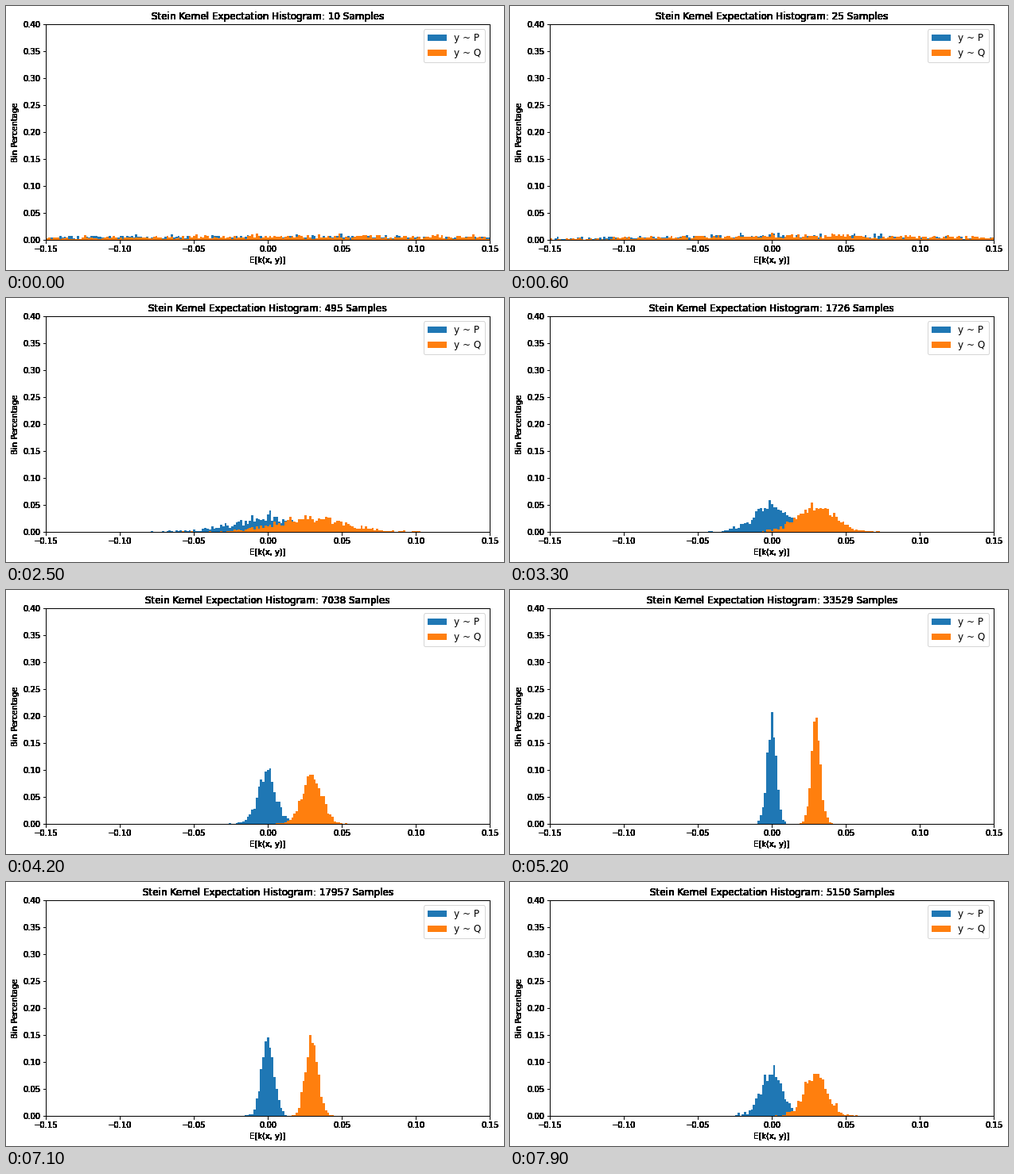
Write a matplotlib script that moves like this. It is 626 px wide and 333 px high and loops after 8000 ms.

```python
import matplotlib.pyplot as plt
import numpy as np
from matplotlib.animation import FuncAnimation

WIDTH, HEIGHT, DPI = 626, 333, 72
FRAMES, INTERVAL = 80, 100
STEPS = 60            # sample counts from 10 to 100000, then back again
TRIALS = 1600
OVERDRAW = 30         # labels look as if printed many times over
EDGES = np.linspace(-0.15, 0.15, 200)
SPREAD = 0.57
MEANS = {"P": -0.0002, "Q": 0.0298}

plt.rcParams.update({"font.family": "DejaVu Sans", "axes.linewidth": 1})
fig = plt.figure(figsize=(WIDTH / DPI, HEIGHT / DPI), dpi=DPI, facecolor="white")
ax = fig.add_axes([50.2 / WIDTH, 37.8 / HEIGHT, 558 / WIDTH, 271.8 / HEIGHT])


def overdraw(image, dpi):
    """Black ink whose soft edges build up as with repeated drawing."""
    inked = np.zeros_like(image)
    inked[..., 3] = 1 - (1 - image[..., 3]) ** OVERDRAW
    return inked, 0, 0


bars = {
    name: ax.stairs(np.zeros(len(EDGES) - 1), EDGES, fill=True,
                    color=color, label=f"y ~ {name}")
    for name, color in (("P", "tab:blue"), ("Q", "tab:orange"))
}
ax.set(xlim=(-0.15, 0.15), ylim=(0, 0.4),
       xlabel="E[k(x, y)]", ylabel="Bin Percentage")
ax.legend(loc="upper right", fontsize=12)
title = ax.set_title("")
for artist in (ax.xaxis, ax.yaxis, title):
    artist.set_agg_filter(overdraw)


def bin_shares(rng, mean, samples):
    """Share of the visible estimates that falls in each bin."""
    noise = rng.standard_t(16, TRIALS) * np.sqrt(14 / 16)
    counts, _ = np.histogram(mean + SPREAD / np.sqrt(samples) * noise, EDGES)
    return counts / counts.sum()


def update(frame):
    step = min(frame, 2 * STEPS - 1 - frame)
    samples = int(10 ** (1 + 4 * step / (STEPS - 1)) + 1e-6)
    rng = np.random.default_rng(step)
    for name, mean in MEANS.items():
        bars[name].set_data(bin_shares(rng, mean, samples))
    title.set_text(f"Stein Kernel Expectation Histogram: {samples} Samples")
    return [*bars.values(), title]


anim = FuncAnimation(fig, update, frames=FRAMES, interval=INTERVAL,
                     repeat=True, repeat_delay=0)
plt.show()
```
